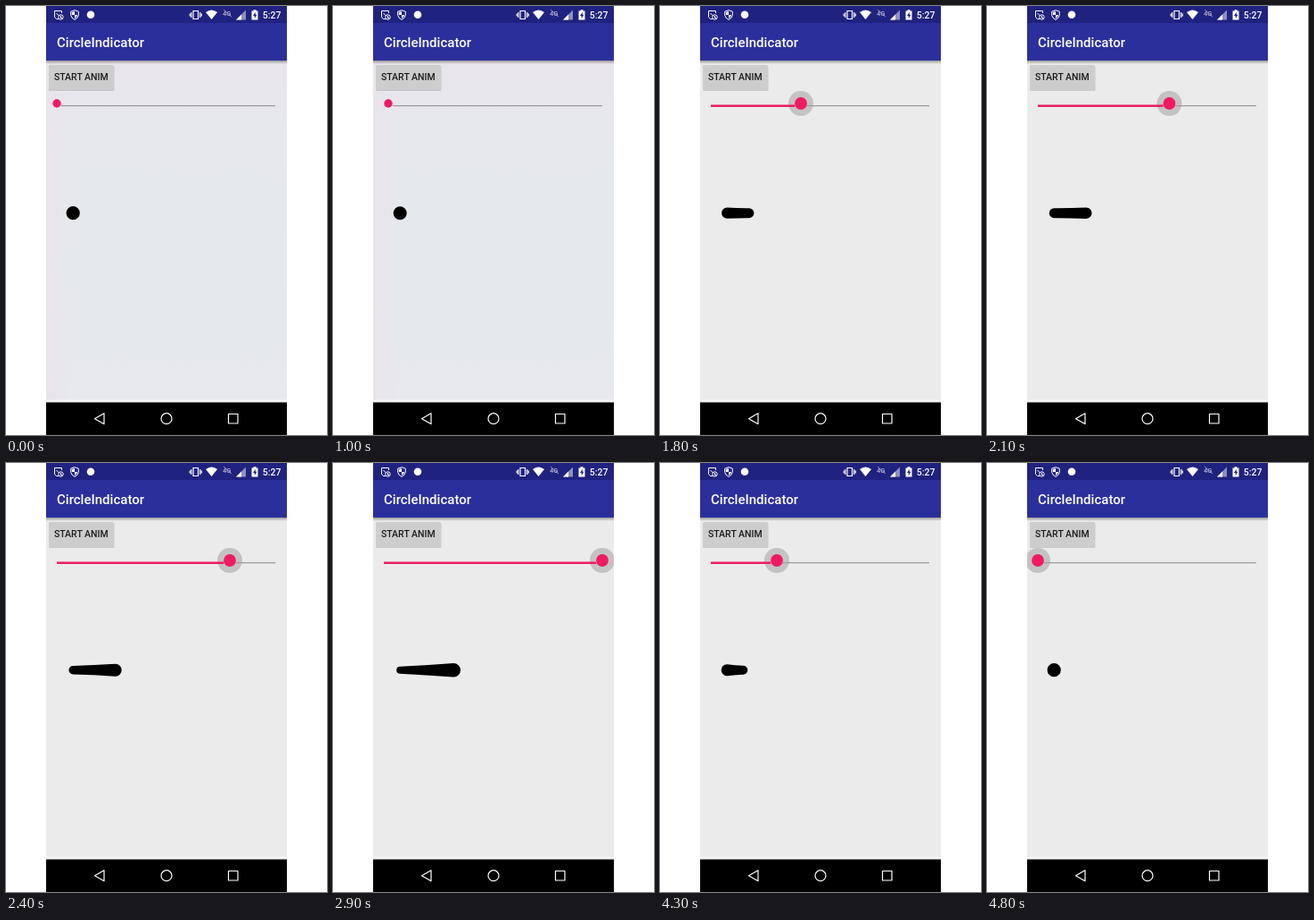
An HTML page for the animation above (5100 ms loop, 360 px wide and 480 px high).

```html
<!DOCTYPE html>
<html lang="en">
<head>
<meta charset="utf-8">
<title>CircleIndicator</title>
<style>
html, body { margin: 0; width: 100%; height: 100%; overflow: hidden; background: #fff; }
svg { display: block; width: 360px; height: 480px; }
text { font: 500 10.5px Roboto, sans-serif; fill: #fff; }
.line { fill: none; stroke: #fff; stroke-width: 1.2; }
</style>
</head>
<body>
<svg viewBox="0 0 360 480">
  <defs>
    <clipPath id="screen"><path d="M45 0h270v480H45z"/></clipPath>
    <linearGradient id="tint" x2="0" y2="1">
      <stop stop-color="#e8e5eb"/><stop offset=".2" stop-color="#e6e8ec"/>
      <stop offset=".6" stop-color="#e5e9ec"/><stop offset="1" stop-color="#e7e9ec"/>
    </linearGradient>
    <linearGradient id="edge">
      <stop stop-color="#e9e4eb"/><stop offset="1" stop-color="#e9e4eb" stop-opacity="0"/>
    </linearGradient>
    <linearGradient id="shade" x2="0" y2="1">
      <stop stop-color="#000" stop-opacity=".35"/><stop offset="1" stop-color="#000" stop-opacity="0"/>
    </linearGradient>
  </defs>
  <g clip-path="url(#screen)">
    <path fill="#ebebeb" d="M45 61h270v383H45z"/>
    <g id="cool">
      <path fill="url(#tint)" d="M45 61h270v383H45z"/>
      <path fill="url(#edge)" d="M45 61h30v383H45z"/>
    </g>
    <path fill="#f3f3f3" d="M45 440.5h270v3H45z"/>
    <path fill="url(#shade)" d="M45 61h270v4H45z"/>
    <path fill="#1f227f" d="M45 0h270v19H45z"/>
    <path fill="#2b2f9c" d="M45 19h270v42H45z"/>
    <text x="57" y="45.7" style="font-size:15px">CircleIndicator</text>

    <!-- status bar -->
    <g class="line" style="stroke-width:1">
      <path d="M59 14.5h-2.5l-2-2V5.500h8V8M56.500 8l3 3"/>
      <circle cx="61.500" cy="12.500" r="2.700"/><path d="M61.500 11v2.500h1.500"/>
      <path d="M77 4.700l4.300 1.500v4q-.4 3.300-4.300 5.200q-3.900-1.900-4.300-5.200v-4z"/>
    </g>
    <path fill="#fff" d="M77 6v4h-3.200V7zM77 10h3.200q-.5 2.500-3.200 4z"/>
    <circle cx="95" cy="9.700" r="4.300" fill="#fff"/>
    <path class="line" d="M210 5.500h5.500v9H210zM207.800 7v6M217.700 7v6M206.200 8.500v3M219.300 8.500v3"/>
    <path fill="#fff" d="M224 7q6.500-5 13 0l-6.500 8z"/>
    <g opacity=".65">
      <text x="243" y="10.500" style="font-size:7.500px">4G</text>
      <path class="line" style="stroke-width:.8" d="M244 4l9 8"/>
    </g>
    <path fill="#8e90bf" d="M269 4.500v11h-11z"/>
    <path fill="#fff" d="M264 9.500v6h-6z"/>
    <path fill="#fff" d="M275.500 5.500h2V4.300h3v1.200h2v10h-7z"/>
    <path fill="#1f227f" d="M279.700 6.800l-2.700 4.200h1.700v3l2.700-4.200h-1.700z"/>
    <text x="308.500" y="13.800" text-anchor="end">5:27</text>

    <!-- button -->
    <rect x="48" y="67" width="73.500" height="28" rx="1.500" opacity=".14"/>
    <rect x="48" y="66" width="73" height="27.700" rx="1.500" fill="#cdcdce"/>
    <text x="54" y="83.300" style="fill:#1c1c1c">START ANIM</text>

    <!-- slider -->
    <circle id="halo" cy="109" fill="#c3c3c3"/>
    <path id="rest" fill="none" stroke="#9b9b9c" stroke-width="1.200"/>
    <path id="done" fill="none" stroke="#e91e63" stroke-width="2.600"/>
    <circle id="thumb" cy="109" fill="#f01a64"/>

    <path id="blob"/>

    <!-- navigation bar -->
    <path d="M45 443.500h270V480H45z"/>
    <path class="line" stroke-linejoin="round" d="M99.500 461.700l10.500-6v12zM249.500 456.500h10.500v10.500h-10.500z"/>
    <circle class="line" cx="180" cy="461.700" r="6"/>
  </g>
</svg>
<script>
const LOOP = 5100, STEP = 100, LEFT = 57, RIGHT = 302;
const position = [[900, 57], [1000, 62], [1100, 71], [1800, 158], [2400, 251], [2700, 299],
  [2900, 302], [3300, 302], [3700, 298], [3800, 282], [4200, 158], [4300, 131],
  [4400, 108], [4500, 88], [4600, 72], [4700, 61], [4800, 57]];
const press = [[1000, 0], [1300, 1], [3100, 1], [3400, 0], [3700, 0], [3900, 1]];
const cool = [[1000, 1], [1500, 0]];

const el = id => document.getElementById(id);
function set(id, attrs) {
  for (const name in attrs) el(id).setAttribute(name, attrs[name]);
}

function at(keys, t) {
  const i = keys.findIndex(k => k[0] > t);
  if (i < 0) return keys[keys.length - 1][1];
  if (i === 0) return keys[0][1];
  const [t0, a] = keys[i - 1], [t1, b] = keys[i];
  return a + (b - a) * (t - t0) / (t1 - t0);
}

// Two circles joined by slightly pinched sides
function blobPath(p) {
  const y = 231.7, x1 = 75.2, x2 = x1 + 60 * p;
  const r1 = 7.6 - 3.6 * p, r2 = 3.8 + 4 * p;
  const disc = (x, r) => `M${x - r} ${y}a${r} ${r} 0 1 1 ${2 * r} 0a${r} ${r} 0 1 1 ${-2 * r} 0z`;
  const mid = (x1 + x2) / 2, pinch = (r1 + r2) * .46;
  return disc(x1, r1) + disc(x2, r2) +
    `M${x1} ${y - r1}Q${mid} ${y - pinch} ${x2} ${y - r2}V${y + r2}Q${mid} ${y + pinch} ${x1} ${y + r1}z`;
}

function draw(t) {
  const x = at(position, t), down = at(press, t), r = 4.7 + 2.2 * down;
  set('cool', { opacity: at(cool, t) });
  set('halo', { cx: x, r: 7 + 7 * down, opacity: down });
  set('thumb', { cx: x, r });
  set('done', { d: x - r > LEFT ? `M${LEFT} 111.7H${x - r}` : '' });
  set('rest', { d: x + r < RIGHT ? `M${x + r} 111.7H${RIGHT}` : '' });
  set('blob', { d: blobPath((x - LEFT) / (RIGHT - LEFT)) });
}

function frame() {
  draw(Math.floor(performance.now() % LOOP / STEP) * STEP);
  requestAnimationFrame(frame);
}
frame();
</script>
</body>
</html>
```
